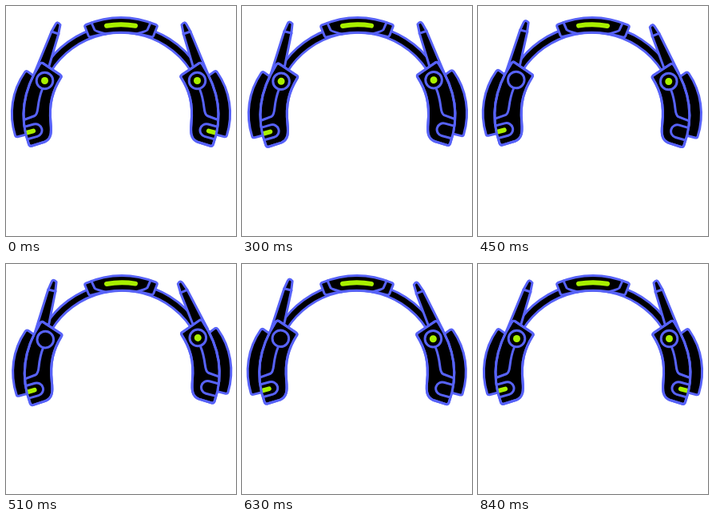
These frames come from a looping animation (288 by 288 pixels, 870 ms). An HTML page with a canvas:

```html
<!DOCTYPE html>
<html>
<head>
<meta charset="utf-8">
<style>
  html, body { margin: 0; width: 100%; height: 100%; overflow: hidden; background: #fff; }
  canvas { display: block; width: 288px; height: 288px; }
</style>
</head>
<body>
<canvas id="stage" width="288" height="288"></canvas>
<script>
const ctx = document.getElementById('stage').getContext('2d');
const BLUE = '#5762f8', GREEN = '#a8f000', BLACK = '#000';
const LOOP = 870, HOLD = 180, STEP = 30;
const LEAD = 8; // half a display refresh, keeps steps from landing late
const SWING = 4.5 * Math.PI / 180;

const shapes = {
  antenna: 'M62 23 Q64.5 18.5 68 23.5 L65.5 36 L54 75 L36 83 L57 32 Z',
  antennaBand: 'M57 32 L66 35',
  pad: 'M34 87 L27 82 Q25 81 23.5 83 C7.5 106 3.2 135 11.5 162 Q12 164 14.5 163.7 L27 160.5 Z',
  cup: 'M46 71.5 L68 86.3 Q70 88 68.5 90 C58.5 106 53.5 122 56 147 C57 158 57 166.5 48 170.3 L32 175.3 Q29.5 175.8 28.5 173 C17 141 20.5 107 42.2 73 Q44 70.5 46 71.5 Z',
  panel: 'M45.5 104 Q41.5 114 40 127 Q39 136 36 137.5 L22.5 142.5',
  slot: 'M22 151.6 L34.8 148 A8 8 0 0 1 39.2 163.4 L26 167',
  slotLight: 'M16 161.5 L34.2 156.5',
  plate: 'M100 23.5 Q144 5.5 188 23.5 Q190 24.5 189 26.5 L184.7 37.3 Q183.7 39.3 181 38.5 Q144 28 107 38.5 Q104.3 39.3 103.3 37.3 L99 26.5 Q98 24.5 100 23.5 Z',
  plateSeams: 'M107 21 L111 30 Q112 31.5 125 35 M181 21 L177 30 Q176 31.5 163 35',
  plateLight: 'M126 24.8 Q144 21.6 162 24.8'
};
for (const name in shapes) shapes[name] = new Path2D(shapes[name]);

function line(path, color = BLUE, width = 3) {
  ctx.strokeStyle = color;
  ctx.lineWidth = width;
  ctx.stroke(path);
}

function solid(path) {
  ctx.fillStyle = BLACK;
  ctx.fill(path);
  line(path);
}

function circle(x, y, r) {
  const path = new Path2D();
  path.arc(x, y, r, 0, 2 * Math.PI);
  return path;
}

function ease(from, to, x) {
  const p = Math.min(1, Math.max(0, (x - from) / (to - from)));
  return p * p * (3 - 2 * p);
}

// Quick rattle that settles over the last few steps.
function tilt(k) {
  if (k === 0) return 0;
  if (k >= 19) return -0.008 * (23 - k) / 4;
  return 0.012 * Math.sin(2 * Math.PI * (0.383 + 0.31 * (k - 1)));
}

function drawBand() {
  const arc = new Path2D();
  arc.arc(144, 137, 108.6, Math.PI * 1.18, Math.PI * 1.82);
  line(arc, BLUE, 12.6);
  line(arc, BLACK, 6.8);
}

function drawSide(swing, discOn, slotOn) {
  ctx.save();
  ctx.translate(42, 85);
  ctx.rotate(swing);
  ctx.translate(-42, -85);
  solid(shapes.antenna);
  line(shapes.antennaBand);
  ctx.restore();

  solid(shapes.pad);
  solid(shapes.cup);

  ctx.save();
  ctx.clip(shapes.cup);
  line(shapes.panel);
  solid(shapes.slot);
  if (slotOn) line(shapes.slotLight, GREEN, 5.8);
  ctx.restore();

  line(shapes.cup);
  solid(circle(48.5, 93.5, 10.3));
  if (discOn) {
    ctx.fillStyle = GREEN;
    ctx.fill(circle(48.5, 93.5, 4.5));
  }
}

function drawPlate() {
  solid(shapes.plate);
  line(shapes.plateSeams);
  line(shapes.plateLight, GREEN, 6);
}

function draw(k) {
  const back = 1 - ease(19, 23, k);
  const leftSwing = -SWING * ease(1, 5, k) * back;
  const rightSwing = SWING * ease(5, 10, k) * back;

  ctx.setTransform(1, 0, 0, 1, 0, 0);
  ctx.fillStyle = '#fff';
  ctx.fillRect(0, 0, 288, 288);
  ctx.lineJoin = ctx.lineCap = 'round';

  ctx.translate(144, 26);
  ctx.rotate(tilt(k));
  ctx.translate(-144, -26);

  drawBand();
  drawSide(leftSwing, k < 8 || k > 20, true);
  ctx.save();
  ctx.translate(288, 0);
  ctx.scale(-1, 1);
  drawSide(rightSwing, true, k < 4 || k > 16);
  ctx.restore();
  drawPlate();
}

const start = performance.now() - LEAD;
function tick() {
  const t = (performance.now() - start) % LOOP;
  draw(t < HOLD ? 0 : Math.floor((t - HOLD) / STEP) + 1);
  requestAnimationFrame(tick);
}
tick();
</script>
</body>
</html>
```
